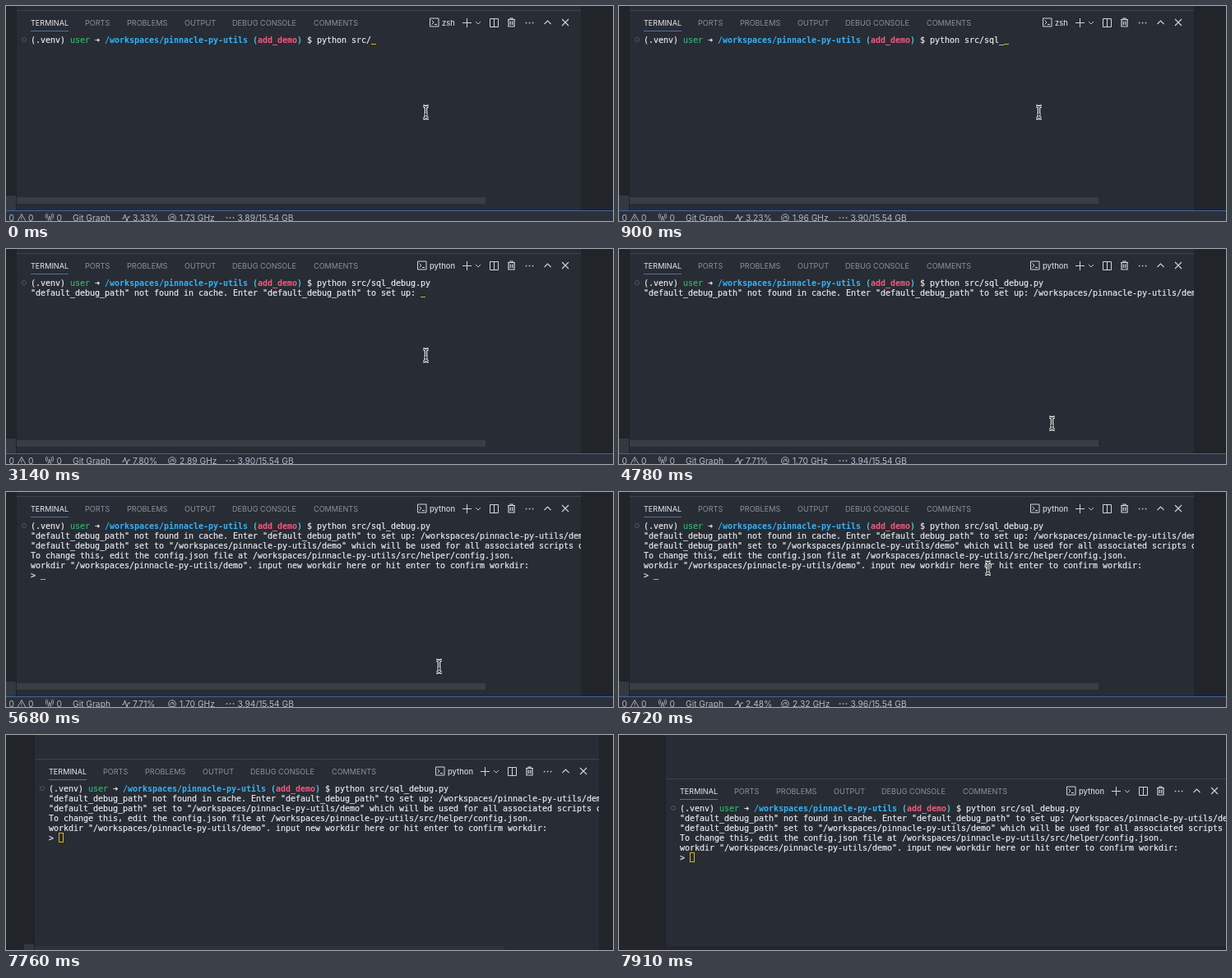
Recreate the animation shown at these times as an HTML page with a canvas. Size 738x262 px, loop 8000 ms.

```html
<!DOCTYPE html>
<html lang="en">
<head>
<meta charset="utf-8">
<title>Terminal session</title>
<style>
html, body { margin: 0; width: 100%; height: 100%; overflow: hidden; background: #282c34; }
canvas { display: block; }
</style>
</head>
<body>
<canvas id="stage" width="738" height="262"></canvas>
<script>
const ctx = document.getElementById('stage').getContext('2d');
const W = 738, H = 262, LOOP = 8000;
const CELL = 6, ROW = 12, LEFT = 30, TOP = 41;
const UI = 'Inter, "Liberation Sans", sans-serif';
const MONO = '"DejaVu Sans Mono", monospace';
const C = {
  bg: '#282c34', side: '#212429', line: '#3d424c', text: '#e6e9ed', dim: '#8b909a',
  icon: '#d0d4da', status: '#b4bac6', accent: '#52709c', green: '#2fb56c', blue: '#34b3f8',
  cyan: '#42c5d8', red: '#f5587a', cursor: '#d6b51c'
};

const TABS = [['TERMINAL', 30], ['PORTS', 96], ['PROBLEMS', 147], ['OUTPUT', 217],
  ['DEBUG CONSOLE', 275], ['COMMENTS', 374]];
const REPO = '/workspaces/pinnacle-py-utils';
const PROMPT = [['(.venv) ', C.text], ['user', C.green], [' ➜ ', C.text], [REPO, C.blue, 1],
  [' (', C.cyan, 1], ['add_demo', C.red, 1], [')', C.cyan, 1], [' $ ', C.text]];
const COMMAND = 'python src/sql_debug.py ';
const ASK = '"default_debug_path" not found in cache. Enter "default_debug_path" to set up: ';
const REPLY = [
  `"default_debug_path" set to "${REPO}/demo" which will be used for all associated scripts of this tool.`,
  `To change this, edit the config.json file at ${REPO}/src/helper/config.json.`,
  `workdir "${REPO}/demo". input new workdir here or hit enter to confirm workdir:`,
  '> '
];

// Step tracks: [start time, value, ...]
const TYPED = [[0, 11], [300, 12], [450, 13], [600, 14], [900, 15], [1190, 18], [1490, 20], [1790, 24]];
const LOAD = [[0, '3.33%', '1.73 GHz', '3.89'], [750, '3.23%', '1.96 GHz', '3.90'],
  [2690, '7.80%', '2.89 GHz', '3.90'], [4780, '7.71%', '1.70 GHz', '3.94'],
  [6720, '2.48%', '2.32 GHz', '3.96']];
const MOUSE = [[0, 510.5, 129.5], [3730, 530, 182], [3880, 549, 246], [4030, 526.5, 212.5]];
const PAN = [[0, 0, 0], [7760, 22, 24], [7910, 44, 48]];

const at = (track, t) => track.filter(k => k[0] <= t).pop();

function rect(x, y, w, h, color) {
  ctx.fillStyle = color;
  ctx.fillRect(x, y, w, h);
}

function label(s, x, y, size, color, weight = 400) {
  ctx.font = `${weight} ${size}px ${UI}`;
  ctx.fillStyle = color;
  ctx.fillText(s, x, y);
}

function stroke(d, x, y, color, width = 1) {
  ctx.save();
  ctx.translate(x, y);
  ctx.strokeStyle = color;
  ctx.lineWidth = width;
  ctx.stroke(new Path2D(d));
  ctx.restore();
}

function dots(x, y, color) {
  for (let i = -1; i < 2; i++) rect(x + i * 4 - 0.7, y - 0.7, 1.5, 1.5, color);
}

// Draws text on the character grid and returns the next column.
function put(s, col, row, color = C.text, bold = 0) {
  ctx.font = `${bold ? 'bold ' : ''}10px ${MONO}`;
  ctx.fillStyle = ctx.strokeStyle = color;
  ctx.lineWidth = 0.2;
  for (const ch of s) {
    const x = LEFT + col++ * CELL, y = TOP + 3.5 + row * ROW;
    if (ch === ' ') continue;
    ctx.fillText(ch, x, y);
    if (!bold) ctx.strokeText(ch, x, y);
  }
  return col;
}

function caret(col, row, hollow) {
  const x = LEFT + col * CELL, y = TOP + row * ROW;
  if (hollow) {
    ctx.strokeStyle = C.cursor;
    ctx.lineWidth = 1;
    ctx.strokeRect(x + 0.5, y - 5.5, 5, 11);
  } else rect(x, y + 5, CELL, 1, C.cursor);
}

function tabs(t) {
  const hover = t >= 7170 && t < 7320;
  TABS.forEach(([s, x], i) =>
    label(s, x, 24, 9.1, i === 0 || (hover && i === 5) ? C.text : C.dim));
  rect(30, 30, 46, 1, C.accent);

  const busy = t >= 2690, x = busy ? 505 : 520;
  stroke('M-5-5H5.5V5H-5ZM-3-2.5L-.5 0L-3 2.5M.5 2.5H3.5', x + 0.5, 20, C.icon);
  label(busy ? 'python' : 'zsh', x + 10, 23.7, 9.3, C.icon, 500);
  stroke('M-5.5 0H5.5M0-5.5V5.5', 560.5, 20.5, C.icon);
  stroke('M-3-1.5L0 1.5L3-1.5', 574, 20.5, C.icon, 0.9);
  stroke('M-5-5H5V5H-5ZM0-5V5', 593.5, 20.5, C.icon);
  stroke('M-4.5-3.5H4.5M-1.5-3.5V-5H1.5V-3.5M-3.5-3.5V5H3.5V-3.5M-1.2-1.5V3M1.2-1.5V3', 614.5, 20, C.icon, 1.2);
  dots(636.5, 20.5, C.icon);
  stroke('M-4 2L0-2L4 2', 658.5, 20, C.icon, 1.1);
  stroke('M-4-4L4 4M4-4L-4 4', 680, 20, C.icon, 1.1);
}

function terminal(t) {
  ctx.save();
  ctx.beginPath();
  ctx.rect(13, 6, 686, 243);
  ctx.clip();
  stroke('M2.5 0A2.5 2.5 0 1 1-2.5 0A2.5 2.5 0 1 1 2.5 0', 22, 41, '#505661');
  let col = 0;
  for (const [s, color, bold] of PROMPT) col = put(s, col, 0, color, bold);
  col = put(COMMAND.slice(0, at(TYPED, t)[1]), col, 0);
  let row = 0;
  if (t >= 2540) { row = 1; col = 0; }
  if (t >= 3140) col = put(ASK, 0, 1);
  if (t >= 4480) col = put(REPO + '/demo', col, 1);
  if (t >= 5680) for (const s of REPLY) col = put(s, 0, ++row);
  caret(col, row, t >= 7760);
  ctx.restore();
}

function statusBar(t) {
  rect(-60, 249, 900, 1, '#3f66a0');
  rect(-60, 250, 900, 60, '#2b303a');
  const [, cpu, clock, mem] = at(LOAD, t);
  const item = (s, x) => label(s, x, 261.8, 10.25, C.status);
  item('0', 3.5);
  stroke('M0-4.5L5 4.5H-5ZM0-1.5V1.5M0 2.4V3.4', 19, 258, C.status, 0.9);
  item('0', 27);
  stroke('M-2-4Q-3.4-1.5-2 1M2-4Q3.4-1.5 2 1M-3.6-5Q-6-1.5-3.6 2M3.6-5Q6-1.5 3.6 2M0-1.5L-2.2 5M0-1.5L2.2 5M-1.2 2.5H1.2',
    53, 257.5, C.status, 0.8);
  item('0', 61.5);
  item('Git Graph', 81);
  stroke('M-5 1H-3L-1.5-4L1 4L2.5-1H5', 146, 258, C.status);
  item(cpu, 154);
  stroke('M-3 3.6A4.5 4.5 0 1 1 3 3.6M-2 2A2.3 2.3 0 1 1 2 2M0 .5L2-2M-3 3.6H3', 202, 258, C.status, 0.9);
  item(clock, 211);
  dots(272.5, 258, C.status);
  item(mem + '/15.54 GB', 281.5);
}

function beam(x, y) {
  const d = 'M-3.2-7.5Q-.6-7.5 0-5.8Q.6-7.5 3.2-7.5M0-5.8V5.8M-3.2 7.5Q-.6 7.5 0 5.8Q.6 7.5 3.2 7.5M-2 2.5H2';
  stroke(d, x, y, '#fff', 3.4);
  stroke(d, x, y, '#14161a', 1.2);
}

function hand(x, y) {
  const d = 'M-1 9V1Q0-.5 1 1V5L5 6Q6 6.5 6 8L5 12V14H-1L-5 9Q-4 7-1 9Z';
  ctx.save();
  ctx.translate(x, y);
  ctx.fillStyle = '#fff';
  ctx.fill(new Path2D(d));
  ctx.restore();
  stroke(d, x, y, '#14161a', 0.9);
}

function mouse(t) {
  if (t >= 7470) return;
  if (t >= 7320) return hand(369, 0);
  let [, x, y] = at(MOUSE, t);
  if (t >= 6270) {
    const p = Math.min(1, (Math.floor((t - 6270) / 150) + 1) / 7);
    const e = p * p * (3 - 2 * p);
    x += (398 - x) * e;
    y += (15 - y) * e;
  }
  (y < 30 ? hand : beam)(x, y);
}

function draw(t) {
  rect(0, 0, W, H, C.bg);
  const [, dx, dy] = at(PAN, t);
  ctx.save();
  ctx.translate(dx, dy);
  rect(-60, -60, 73, 400, C.side);
  rect(699, -60, 100, 400, C.side);
  rect(12, -60, 1, 400, '#1f2227');
  rect(0, 231, 12, 18, '#343841');
  rect(13, 5, 686, 1, C.line);
  rect(13, 233, 570, 8, t < 7170 ? '#393d45' : '#30343c');
  tabs(t);
  terminal(t);
  statusBar(t);
  mouse(t);
  ctx.restore();
  if (t >= 7910) rect(0, 257, W, 5, '#23262c');
}

const start = performance.now();
function tick() {
  draw((performance.now() - start) % LOOP);
  requestAnimationFrame(tick);
}
tick();
</script>
</body>
</html>
```
